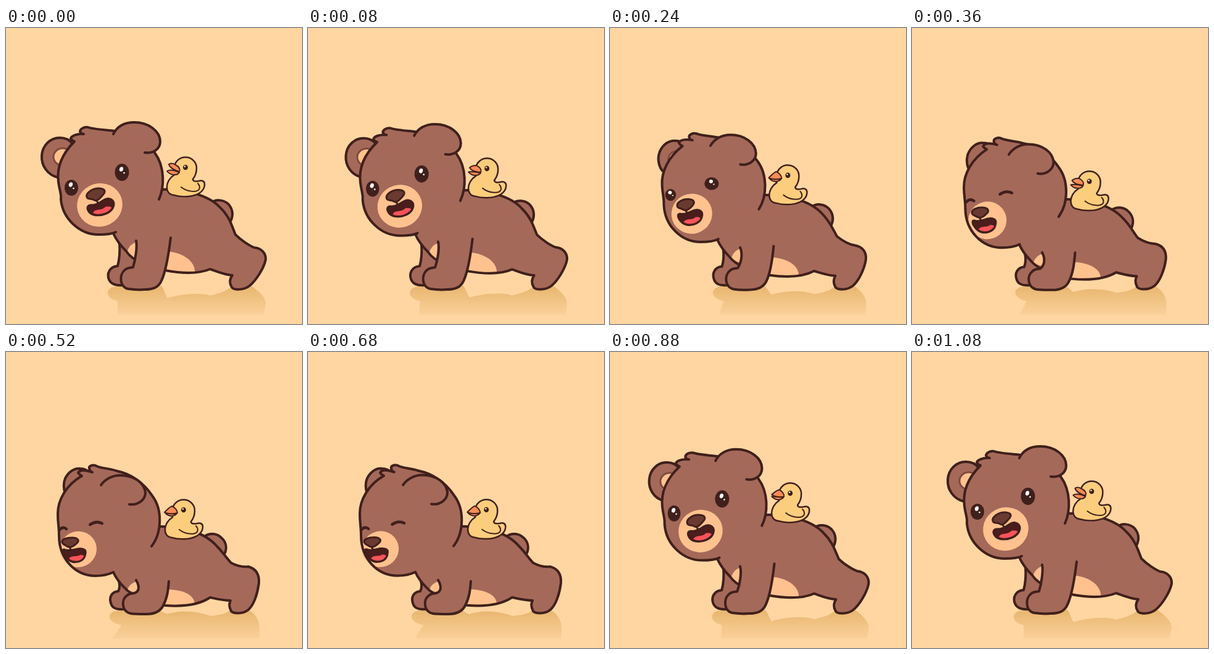
These frames come from a looping animation (480 px wide and 480 px high, 1.12 s). An HTML page with a canvas:

```html
<!DOCTYPE html>
<html lang="en">
<head>
<meta charset="utf-8">
<title>Bear push-ups</title>
<style>
html, body { margin: 0; width: 100%; height: 100%; overflow: hidden; background: #ffd6a2; }
canvas { display: block; }
</style>
</head>
<body>
<canvas id="stage" width="480" height="480"></canvas>
<script>
const ctx = document.getElementById('stage').getContext('2d');
const LOOP = 1120, STEP = 40;
const INK = '#40201c', FUR = '#a5695a', PEACH = '#ffc28e', YELLOW = '#fbcd7c', ORANGE = '#fa8b58';

// Each shape: path with arms stretched, path with arms bent.
const shapes = {
  shadow: [
    'M165,428 C168,418 180,419 190,419 L252,418 C257,425 258,432 262,438 C280,432 315,428 331,434 C345,430 356,428 364,420 L395,416 C412,428 422,438 421,448 L418,465 L181,465 L181,443 C172,441 164,436 165,428',
    'M168,428 C170,419 182,419 192,419 L250,419 C255,422 258,424 262,425 C280,418 312,420 331,428 C345,427 356,425 362,420 L393,418 C405,425 411,435 411,448 L411,465 L173,465 L187,443 C178,441 167,436 168,428'],
  tail: [
    'M332,284 C340,277 353,278 361,286 C369,295 369,307 362,317',
    'M322,299 C330,293 342,294 349,301 C356,307 359,316 355,326'],
  farArm: [
    'M184,348 C185,362 184,375 181,386 C168,387 163,398 167,408 C171,417 180,418 190,417 L205,410 L212,365',
    'M183,372 C185,378 184,384 182,388 C171,389 167,398 170,407 C172,416 180,418 192,417 L207,410 L214,385'],
  body: [
    'M250,262 C290,260 330,272 347,291 C362,305 366,320 372,335 C382,345 395,353 402,356 C415,357 422,366 421,376 C418,390 405,410 395,418 C385,426 368,425 366,420 C361,412 364,405 367,401 C352,400 340,394 331,391 C312,399 285,398 258,393 C235,390 205,378 195,362 C185,352 178,342 174,333',
    'M246,283 C285,282 322,292 342,315 C352,325 358,335 365,342 C375,347 385,349 393,348 C407,352 411,362 410,375 C408,392 402,410 393,418 C383,426 368,424 365,420 C361,412 362,408 364,403 C352,403 340,400 331,398 C312,411 285,413 258,411 C235,407 205,397 192,382 C184,374 178,366 174,357'],
  chest: [
    'M196,364 Q200,350 212,347 L212,374 Q203,371 196,364',
    'M197,385 Q201,375 212,372 L214,390 Q204,390 197,385'],
  belly: [
    'M255,362 C285,362 308,378 306,397 C290,399 270,396 250,393 Z',
    'M255,385 C285,384 306,393 306,409 C290,413 270,412 250,411 Z'],
  nearArm: [
    'M267,340 C264,365 259,395 252,410 C247,421 238,424 225,424 C215,425 205,424 198,423 C184,420 183,400 193,392 C198,388 203,389 206,388 C210,375 213,355 211,345',
    'M264,372 C263,385 262,398 255,411 C250,421 240,425 228,425 C218,425 208,425 202,424 C188,421 186,402 196,395 C200,391 204,392 208,391 C215,389 218,382 211,370'],
  leftEar: [
    'M83,242 C68,238 57,224 58,207 C59,190 72,178 87,178 C97,178 104,182 108,188',
    'M96,228 C93,222 93,212 96,205 C101,195 110,188 120,189 C126,189 131,191 134,195'],
  head: [
    'M248,278 C257,258 258,225 241,202 C225,180 205,172 177,167 C160,165 140,164 133,161 C126,160 120,164 120,168 Q122,172 126,172 C115,171 106,175 105,179 Q107,183 111,184 C90,205 82,228 85,250 C87,265 90,268 89,278 C92,310 120,335 150,335 C165,335 172,334 178,331',
    'M236,315 C253,293 254,255 237,233 C222,210 200,197 180,193 C165,188 155,189 147,185 C142,182 134,184 135,189 Q137,195 140,195 C128,191 120,190 117,196 Q119,199 123,201 C98,215 84,240 84,262 C84,280 86,282 86,298 C86,335 112,363 145,363 C160,363 168,360 174,357'],
  rightEar: [
    'M174,172 C180,160 192,153 208,153 C232,153 250,168 250,184 C250,197 238,204 225,202',
    'M154,216 C160,207 172,200 185,200 C208,200 224,212 226,228 C226,240 214,249 200,247'],
  nose: [
    'M131,274 C129,268 140,259 152,260 C162,261 162,266 156,272 C149,280 146,281 143,279 C139,276 132,279 131,274 Z',
    'M91,308 C91,303 99,301 107,301 C116,301 119,305 116,309 C110,315 105,318 101,316 C96,313 91,312 91,308 Z'],
  lip: ['M147,280 L150,285', 'M103,316 L105,321'],
  mouth: [
    'M137,287 C148,288 154,281 160,278 C168,274 176,279 175,287 C173,300 155,306 142,303 C132,300 128,288 137,287 Z',
    'M94,320 C101,324 110,320 117,319 C126,318 130,321 129,326 C128,337 120,341 110,341 C99,340 87,321 94,320 Z'],
  tongue: [
    'M141,300 C144,292 156,297 161,290 C167,289 172,290 171,292 C164,301 150,304 141,300 Z',
    'M102,335 C106,329 115,333 120,329 C125,329 127,330 126,332 C121,340 110,341 102,335 Z'],
  // Beak: closed, open.
  upperBeak: [
    'M260,230 C264,226 268,222 272,220 C277,222 281,227 281,231 C275,233 265,233 260,230 Z',
    'M264,221 C268,218 272,220 275,222 C281,225 283,229 281,233 C275,231 266,228 264,221 Z'],
  lowerBeak: [
    'M261,231 C267,232 275,233 280,232 C276,237 267,238 261,231 Z',
    'M261,232 C266,229 274,231 281,234 C278,240 266,239 261,232 Z']
};

const clamp = x => Math.min(1, Math.max(0, x));
const smooth = x => (x = clamp(x)) * x * (3 - 2 * x);
const lerp = (a, b, k) => a + (b - a) * k;

// Points swing on an arc: sideways motion runs ahead of the drop.
const ahead = k => k * (1.5 - 0.5 * k);
const mixX = (a, b, k) => lerp(a, b, ahead(k));

function morph(name, k) {
  const [from, to] = shapes[name];
  const ends = to.match(/[\d.]+/g);
  let i = 0;
  return new Path2D(from.replace(/[\d.]+/g, n => {
    const mix = i % 2 ? lerp : mixX;
    return mix(+n, +ends[i++], k);
  }));
}

function paint(path, fill, width, ink = INK) {
  if (fill) { ctx.fillStyle = fill; ctx.fill(path); }
  if (width) { ctx.lineWidth = width; ctx.strokeStyle = ink; ctx.stroke(path); }
}

function oval(x, y, rx, ry, turn = 0) {
  const path = new Path2D();
  path.ellipse(x, y, rx, ry, turn, 0, 7);
  return path;
}

function drawShadow(dip) {
  const fade = ctx.createLinearGradient(0, 422, 0, 466);
  fade.addColorStop(0, '#e9b872');
  fade.addColorStop(1, '#fbd19b');
  paint(morph('shadow', dip), fade);
}

function drawDuck(dip, sway, open) {
  ctx.save();
  ctx.translate(-2.7 * dip - sway, 30 * dip);
  paint(new Path2D('M273,238 C257,248 257,270 272,271 C282,274 296,274 303,272 C316,269 323,261 322,252 C321,247 316,247 313,248 C308,249 303,249 303,245 C307,240 309,235 309,228 A18,17.5 0 0 0 273,226 Z'), YELLOW, 2.5);
  paint(new Path2D('M284,258 C294,266 313,268 314,259 Q314,255 311,252'), null, 2);
  paint(morph('lowerBeak', open), ORANGE, 2);
  paint(morph('upperBeak', open), ORANGE, 2);
  paint(oval(291, 226, 4, 4.3), INK);
  paint(oval(290, 224.5, 1.2, 1.2), '#fff');
  ctx.restore();
}

function drawEye(x, y, rx, ry, shut) {
  if (shut > 0.6) {
    const w = rx * 0.85;
    paint(new Path2D(`M${x - w},${y + 3} Q${x},${y - 4} ${x + w},${y + 1}`), null, 4.5);
    return;
  }
  const squash = 1 - shut;
  paint(oval(x, y, rx, ry * squash), INK);
  paint(oval(x - 1, y - 5 * squash, 3, 3.8 * squash, 0.3), '#fff');
  paint(oval(x + 3.5, y + 1, 1.3, 1.3 * squash), '#fff');
}

function drawHead(dip, shut) {
  paint(morph('leftEar', dip), FUR, 4);
  paint(oval(mixX(92, 124, dip), lerp(209, 219, dip), 15, 14), PEACH, 3, '#7f4a3e');
  const head = morph('head', dip);
  paint(head, FUR);
  paint(oval(mixX(152, 117, dip), lerp(287, 320, dip), mixX(37, 30, dip), lerp(35, 29, dip), -0.3), PEACH);
  paint(head, null, 4);
  paint(morph('rightEar', dip), FUR, 4);
  drawEye(mixX(188, 146, dip), lerp(234, 277, dip), 11.5, 14, shut);
  drawEye(mixX(106, 92, dip), lerp(259, 286, dip), mixX(11, 7, dip), 13, shut);
  paint(morph('lip', dip), null, 3);
  paint(morph('nose', dip), '#6a3a30', 3);
  paint(morph('mouth', dip), '#4b1d1c', 3);
  paint(morph('tongue', dip), '#f9535a');
}

function draw(t) {
  const rise = clamp((t - 660) / 420);
  const dip = t < 600 ? smooth(t / 530) : (1 - rise ** 2.2) ** 8.3;
  const sway = 1.5 * Math.sin(2 * Math.PI * t / LOOP);
  const shut = smooth((t - 200) / 120) - smooth((t - 690) / 90);
  const gap = Math.max(1 - t / 200, 0.6 - Math.abs(t - 360) / 200, (t - 840) / 200);

  ctx.fillStyle = '#ffd6a2';
  ctx.fillRect(0, 0, 480, 480);
  drawShadow(dip);
  paint(morph('tail', dip), FUR, 4);
  paint(morph('farArm', dip), FUR, 4);
  const body = morph('body', dip);
  paint(body, FUR);
  paint(morph('chest', dip), PEACH);
  paint(morph('belly', dip), PEACH);
  paint(body, null, 4);
  paint(morph('nearArm', dip), FUR, 4);
  drawDuck(dip, sway, clamp(gap));
  drawHead(dip, shut);
}

ctx.lineCap = ctx.lineJoin = 'round';
const start = performance.now();
function tick() {
  const t = (performance.now() - start) % LOOP;
  draw(Math.floor(t / STEP) * STEP);
  requestAnimationFrame(tick);
}
tick();
</script>
</body>
</html>
```
